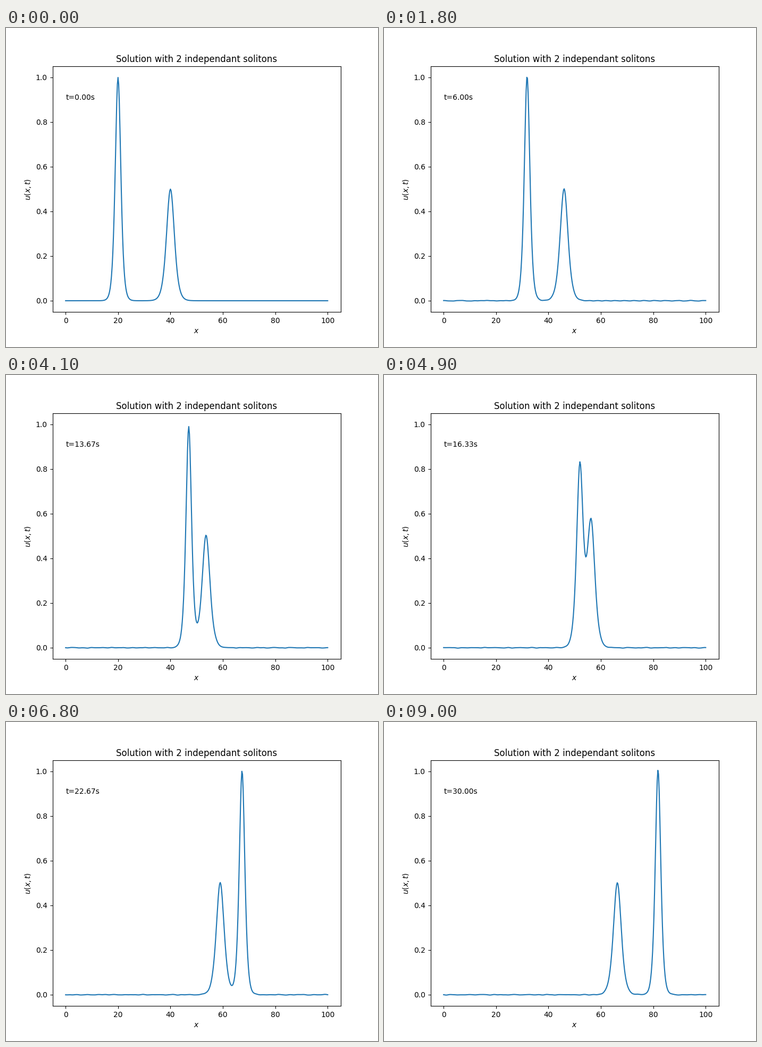
A matplotlib script for the animation above (9100 ms loop, 700x600 px).

```python
import numpy as np
import matplotlib.pyplot as plt
from matplotlib.animation import FuncAnimation

# Korteweg-de Vries equation: u_t + 6 u u_x + u_xxx = 0, periodic domain
LENGTH = 100
DX = 0.25
FRAMES = 91
FRAME_DT = 1 / 3
SUBSTEPS = 40


def soliton(x, speed):
    return 0.5 * speed / np.cosh(0.5 * np.sqrt(speed) * x) ** 2


def rate(u):
    """Central differences in space."""
    right, left = np.roll(u, -1), np.roll(u, 1)
    right2, left2 = np.roll(u, -2), np.roll(u, 2)
    u_x = (right - left) / (2 * DX)
    u_xxx = (right2 - 2 * right + 2 * left - left2) / (2 * DX ** 3)
    return -6 * u * u_x - u_xxx


def rk4(u, dt):
    k1 = rate(u)
    k2 = rate(u + dt / 2 * k1)
    k3 = rate(u + dt / 2 * k2)
    k4 = rate(u + dt * k3)
    return u + dt / 6 * (k1 + 2 * k2 + 2 * k3 + k4)


def solve(u):
    states = [u]
    for _ in range(FRAMES - 1):
        for _ in range(SUBSTEPS):
            u = rk4(u, FRAME_DT / SUBSTEPS)
        states.append(u)
    return states


x = np.linspace(0, LENGTH, round(LENGTH / DX) + 1)
states = solve(soliton(x - 20, 2) + soliton(x - 40, 1))

fig, ax = plt.subplots(figsize=(7, 6), dpi=100)
line, = ax.plot(x, states[0])
clock = ax.text(0, 0.9, "t=0.00s")
ax.set_title("Solution with 2 independant solitons")
ax.set_xlabel("$x$")
ax.set_ylabel("$u(x,t)$")
ax.set_xlim(-5, 105)
ax.set_ylim(-0.05, 1.05)


def update(i):
    line.set_ydata(states[i])
    clock.set_text(f"t={i * FRAME_DT:.2f}s")
    return line, clock


anim = FuncAnimation(fig, update, frames=FRAMES, interval=100,
                     repeat=True, repeat_delay=0)
plt.show()
```
